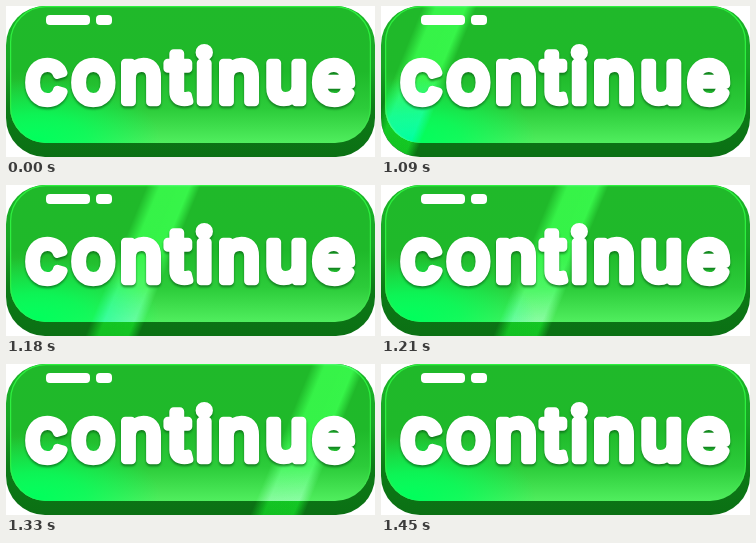
These frames come from a looping animation (369x151 px, 1950 ms). An HTML page:

```html
<!DOCTYPE html>
<html lang="en">
<head>
<meta charset="utf-8">
<title>Continue button</title>
<style>
  html, body { margin: 0; width: 100%; height: 100%; overflow: hidden; background: #fff; }
  svg { display: block; width: 369px; height: 151px; isolation: isolate; }
  .light { mix-blend-mode: color-dodge; }
  .label {
    font: 400 72px Inter, "Open Sans", sans-serif;
    font-optical-sizing: none;
    letter-spacing: 4.8px;
    text-anchor: middle;
    fill: #fff;
    stroke: #fff;
    stroke-width: 8.6px;
    stroke-linejoin: round;
    stroke-linecap: round;
    filter: drop-shadow(0 2px 1px rgba(6, 88, 18, .65));
  }
</style>
</head>
<body>
<svg viewBox="0 0 369 151">
  <defs>
    <linearGradient id="side" x2="0" y2="1">
      <stop offset="0" stop-color="#1db62a"/>
      <stop offset=".4" stop-color="#17a324"/>
      <stop offset=".68" stop-color="#0c7a16"/>
      <stop offset="1" stop-color="#0b7014"/>
    </linearGradient>
    <linearGradient id="face" x2="0" y2="1">
      <stop offset="0" stop-color="#20b92a"/>
      <stop offset=".48" stop-color="#1fb92a"/>
      <stop offset=".75" stop-color="#2ccc3a"/>
      <stop offset="1" stop-color="#50ee5e"/>
    </linearGradient>
    <linearGradient id="rim" x2="0" y2="1">
      <stop offset="0" stop-color="#2df03f"/>
      <stop offset=".7" stop-color="#2df03f"/>
      <stop offset="1" stop-color="#50ee5e" stop-opacity="0"/>
    </linearGradient>
    <radialGradient id="glow">
      <stop offset="0" stop-color="#00ff5c"/>
      <stop offset=".4" stop-color="#00ff5c" stop-opacity=".75"/>
      <stop offset="1" stop-color="#00ff5c" stop-opacity="0"/>
    </radialGradient>
    <!-- Runs perpendicular to the slanted edges of the band -->
    <linearGradient id="streak" gradientUnits="userSpaceOnUse" x1="0" y1="0" x2="46.2" y2="19">
      <stop offset="0" stop-color="#767676" stop-opacity="0"/>
      <stop offset=".25" stop-color="#767676" stop-opacity=".82"/>
      <stop offset=".8" stop-color="#767676" stop-opacity=".85"/>
      <stop offset="1" stop-color="#767676" stop-opacity="0"/>
    </linearGradient>
    <clipPath id="body"><rect width="369" height="151" rx="39"/></clipPath>
    <clipPath id="top"><rect x="4" width="361" height="137" rx="36"/></clipPath>
  </defs>

  <rect width="369" height="151" rx="39" fill="url(#side)"/>
  <g clip-path="url(#top)">
    <rect x="4" width="361" height="137" fill="url(#face)"/>
    <ellipse cx="30" cy="134" rx="125" ry="62" fill="url(#glow)"/>
  </g>
  <rect x="4.6" y=".6" width="359.8" height="135.8" rx="35.4" fill="none" stroke="url(#rim)" stroke-width="1.2"/>

  <g class="light" clip-path="url(#body)">
    <path id="shine" d="M0 0H54L-8 151H-62Z" fill="url(#streak)"/>
  </g>

  <g fill="#fff">
    <rect x="40" y="9" width="44" height="10" rx="4"/>
    <rect x="90" y="9" width="16" height="10" rx="4"/>
  </g>
  <text class="label" x="186.5" y="96">continue</text>
</svg>
<script>
  const LOOP = 1950, START = 1030, END = 1450, STEP = 30;
  const FROM = -24, TRAVEL = 33;
  const shine = document.getElementById('shine');

  function draw(now) {
    const t = now % LOOP;
    const active = t >= START && t < END;
    const x = FROM + Math.floor((t - START) / STEP) * TRAVEL;
    shine.setAttribute('visibility', active ? 'visible' : 'hidden');
    shine.setAttribute('transform', `translate(${x} 0)`);
  }

  const begin = performance.now();
  function tick() {
    draw(performance.now() - begin);
    requestAnimationFrame(tick);
  }
  tick();
</script>
</body>
</html>
```
